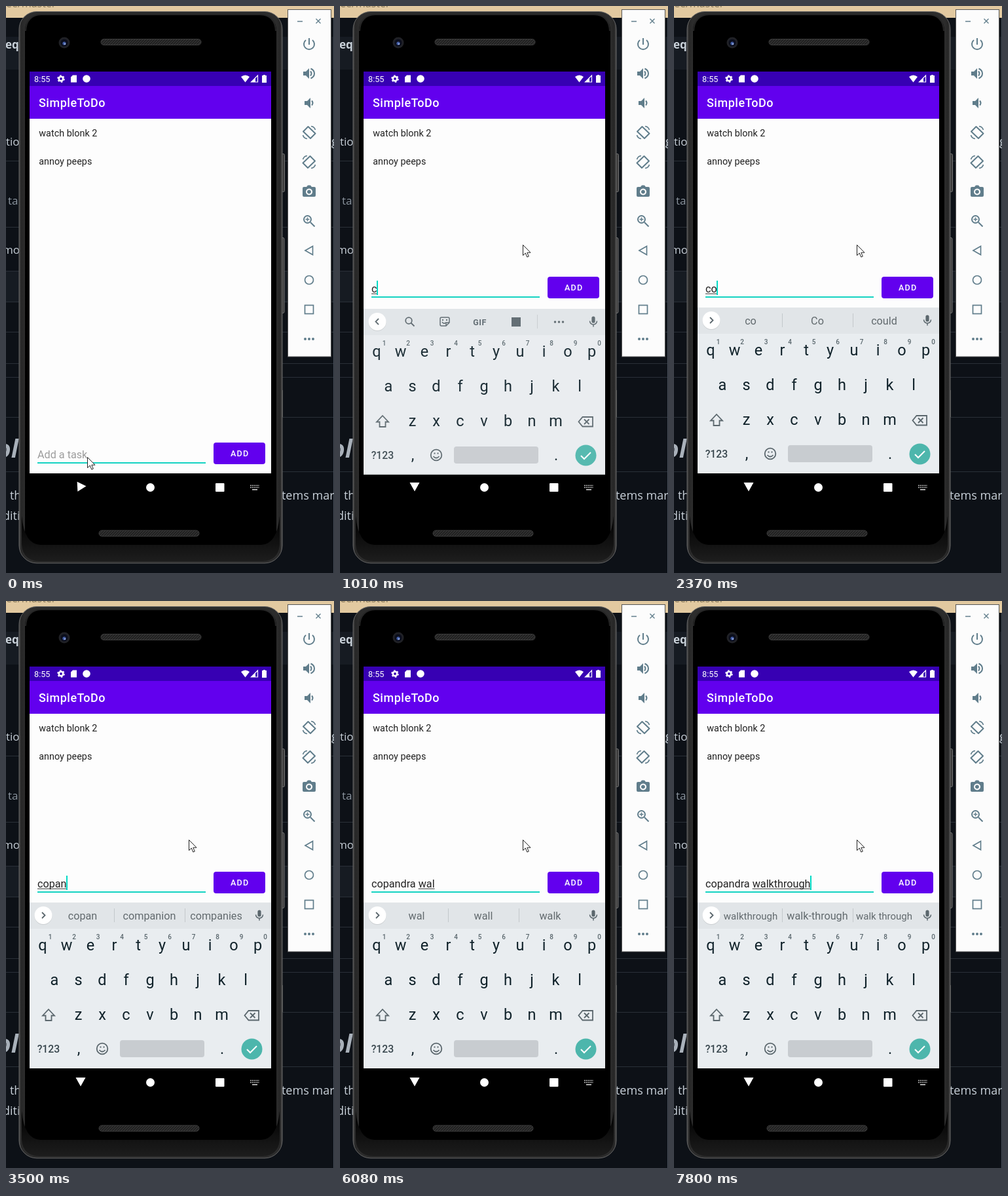
Animation, 501 px wide and 865 px high, one loop 8000 ms. Source, as an HTML page:

```html
<!DOCTYPE html>
<html lang="en">
<head>
<meta charset="utf-8">
<title>To-do app demo</title>
<style>
  html, body { margin: 0; width: 100%; height: 100%; overflow: hidden; background: #0d1117; }
  svg { display: block; width: 501px; height: 865px; font-family: Roboto, sans-serif; }
  text { white-space: pre; }
  .page { font: 18px "Open Sans", sans-serif; fill: #c9d1d9; }
  .mid { text-anchor: middle; }
  .line { fill: none; stroke-width: 2; }
  .tools { fill: #607d8b; stroke: #607d8b; }
  .tools g { stroke-width: 0; }
  .tools .line { stroke-width: 2; fill: none; }
  .tools .thin { stroke-width: 1.7; }
  .keys { font-size: 23.5px; fill: #10222a; }
  .digits { font-size: 10px; fill: #59666c; }
  .words { font-size: 16.2px; fill: #626a6e; }
  .grey { fill: #5b676d; stroke: none; }
  .greyLine { fill: none; stroke: #5b676d; stroke-width: 1.8; }
</style>
</head>
<body>
<svg viewBox="0 0 501 865">
  <defs>
    <linearGradient id="frame">
      <stop offset="0" stop-color="#4a4a4a"/><stop offset=".008" stop-color="#262626"/>
      <stop offset=".02" stop-color="#2c2c2c"/><stop offset=".98" stop-color="#2c2c2c"/>
      <stop offset=".992" stop-color="#262626"/><stop offset="1" stop-color="#4a4a4a"/>
    </linearGradient>
    <linearGradient id="chin" x2="0" y2="1">
      <stop offset="0" stop-color="#000"/><stop offset="1" stop-color="#1d1d1d"/>
    </linearGradient>
    <pattern id="mesh" width="4" height="4" patternUnits="userSpaceOnUse">
      <rect width="4" height="4" fill="#222"/><path d="M0 4L4 0" stroke="#3c3c3c"/>
    </pattern>
    <clipPath id="screen"><rect x="36" y="100" width="369" height="615"/></clipPath>
  </defs>

  <!-- web page behind the emulator -->
  <rect width="501" height="865" fill="#0d1117"/>
  <path fill="#161b22" d="M0 47h501v50H0zM0 404h501v47H0z"/>
  <rect width="501" height="18" fill="#e2c9a0"/>
  <path stroke="#2a3038" d="M0 236.5h501M0 337.5h501M0 404.5h501M0 451.5h501M0 497.5h501M0 545.5h501M0 566.5h501M0 627.5h501M0 710.5h501"/>
  <path stroke="#444c56" d="M500.5 18v847"/>
  <g class="page">
    <text x="0" y="2" font-size="16" style="fill:#857658">ee/master</text>
    <text x="-1" y="65" font-size="17" font-weight="700">eq</text>
    <text x="0" y="213" font-size="17">tio</text>
    <text x="3" y="303" font-size="17" style="fill:#8b949e">ta</text>
    <text x="-5" y="378" font-size="17">mo</text>
    <text x="-14" y="689" font-size="37" font-weight="700" font-style="italic" style="fill:#a9b1ba">ol</text>
    <text x="6" y="753">th</text>
    <text x="-5" y="784">diti</text>
    <text x="421" y="753">tems mar</text>
    <text x="497" y="213">g</text>
  </g>

  <!-- phone body -->
  <g fill="#3b3b3b" stroke="#747474">
    <rect x="418" y="225.5" width="7.5" height="58" rx="2"/>
    <rect x="418" y="353.5" width="7" height="115" rx="2"/>
    <path d="M422.5 586v41" stroke="#555"/>
  </g>
  <rect x="20" y="8.5" width="402" height="841.5" rx="27" fill="url(#frame)" stroke="#666"/>
  <rect x="29" y="13" width="384" height="832" rx="24" fill="#000"/>
  <path d="M24 778V822Q26 846 50 847H392Q416 846 418 822V778Q414 821 390 822H52Q28 821 24 778Z" fill="url(#chin)"/>
  <path d="M30 38Q31 14 54 13H388Q411 14 412 38" fill="none" stroke="#262626" stroke-width="2"/>
  <g fill="url(#mesh)" stroke="#3d3d3d">
    <rect x="145" y="50.5" width="153" height="9" rx="4.5"/>
    <rect x="142" y="800" width="153" height="9" rx="4.5"/>
  </g>
  <circle cx="89" cy="56" r="8.5" fill="#202126"/>
  <circle cx="89" cy="56" r="5.5" fill="#0b0e1c"/>
  <circle cx="89" cy="57" r="2.6" fill="#4560a8"/>
  <circle cx="90" cy="58" r="1" fill="#c2d0f4"/>

  <!-- app -->
  <rect x="36" y="172" width="369" height="541" fill="#fdfdfd"/>
  <rect x="36" y="100" width="369" height="22" fill="#3700b3"/>
  <rect x="36" y="122" width="369" height="50" fill="#6200ee"/>
  <g fill="#fff">
    <text x="43" y="116" font-size="12.7">8:55</text>
    <circle cx="84" cy="111" r="3.2" fill="none" stroke="#fff" stroke-width="2.6"/>
    <circle cx="84" cy="111" r="5" fill="none" stroke="#fff" stroke-width="1.6" stroke-dasharray="2.6 2.636"/>
    <path d="M102 105.5h6v11h-9v-8zM359 108q6.500-5 13 0l-6.500 8.500zM391 106h2v-1h3v1h2v11h-7z"/>
    <circle cx="123" cy="111" r="5.8"/>
    <path d="M384.5 106v10h-10z" fill="none" stroke="#fff" stroke-width="1.2"/>
    <path d="M381 110v6h-6z"/>
    <text x="50" y="154" font-size="18" font-weight="500" letter-spacing=".5">SimpleToDo</text>
  </g>
  <g font-size="14.4" fill="#212121">
    <text x="50.3" y="199">watch blonk 2</text>
    <text x="50.3" y="242">annoy peeps</text>
  </g>

  <g id="bar">
    <rect x="48" y="443" width="257" height="2" fill="#14d3c2"/>
    <text id="hint" x="48" y="437" font-size="16.2" fill="#9d9d9d">Add a task</text>
    <text id="entry" x="48" y="437" font-size="16.2" fill="#212121"></text>
    <rect id="under" y="438.5" height="1" fill="#333"/>
    <rect id="caret" y="419" width="2" height="22" fill="#03dac5"/>
    <rect x="317" y="413" width="79" height="33" rx="4" fill="#6200ee"/>
    <text class="mid" x="357.2" y="434" font-size="12.6" font-weight="500" letter-spacing="1.12" fill="#fff">ADD</text>
  </g>

  <!-- navigation bar -->
  <g fill="#fff">
    <path id="back" d="M-7.500-6H7.500L0 7.500Z"/>
    <circle cx="220.5" cy="734.5" r="6.5"/>
    <rect x="320" y="728" width="13.5" height="13" rx="1"/>
    <path stroke="#ddd" stroke-width="1.5" stroke-dasharray="1.5 1.2" d="M373 731.5h14M373 734.5h14"/>
    <path stroke="#ddd" stroke-width="1.5" d="M376 737.8h8"/>
  </g>

  <!-- on-screen keyboard -->
  <g clip-path="url(#screen)"><g id="keyboard">
    <rect x="36" y="460" width="369" height="253" fill="#e9edf0"/>
    <rect x="36" y="460" width="369" height="40" fill="#e1e5e8"/>
    <circle cx="57" cy="480.5" r="13.5" fill="#000" opacity=".1"/>
    <circle cx="57" cy="479.5" r="13.5" fill="#fff"/>
    <path id="chevron" class="greyLine" d="M-2-4.500L2.500 0L-2 4.500"/>
    <g class="grey" transform="translate(387 479.5)">
      <rect x="-2.6" y="-8" width="5.2" height="10" rx="2.6"/>
      <path class="greyLine" style="stroke-width:1.5" d="M-5.500-1A5.500 5.500 0 0 0 5.500-1M0 4.500V8"/>
    </g>
    <g id="shortcuts">
      <circle class="greyLine" cx="105" cy="478" r="4.8"/>
      <path class="greyLine" d="M108.5 481.5l5 5"/>
      <path class="greyLine" style="stroke-width:1.5" d="M155 473h10q2 0 2 2v6l-5 5h-7q-2 0-2-2v-9q0-2 2-2zM167 481h-5v5M156 480q3 4 5 1"/>
      <path class="grey" d="M156 476h2v2h-2zM162 476h2v2h-2z"/>
      <text class="mid grey" x="213.5" y="484.5" font-size="12.5" font-weight="700" letter-spacing=".5">GIF</text>
      <rect class="grey" x="262" y="473" width="14" height="14"/>
      <path stroke="#c7cccf" d="M301.5 469v21"/>
      <path class="greyLine" stroke-linecap="round" style="stroke-width:3.5" d="M328.5 480h0M334.5 480h0M340.5 480h0"/>
    </g>
    <g id="strip" class="words mid">
      <path stroke="#c3c8cb" d="M165.5 469v21M273.5 469v21"/>
      <text x="117" y="486"></text><text x="219" y="486"></text><text x="321" y="486"></text>
    </g>
    <g id="keys" class="keys mid"></g>
    <g id="digits" class="digits mid" font-weight="500"></g>
    <path class="greyLine" d="M65 623l9 9.500h-4.500v7.500h-9v-7.500h-4.500z"/>
    <path class="greyLine" d="M370.5 625h15.500v14.500h-15.500l-6-7.250zM373 628.5l7.500 7.500M380.5 628.5l-7.500 7.500"/>
    <text class="mid" x="65" y="689" font-size="15.8" font-weight="500" fill="#3a484f">?123</text>
    <g class="keys mid"><text x="111" y="691">,</text><text x="330" y="691">.</text></g>
    <circle class="greyLine" cx="147" cy="683" r="8.3"/>
    <path class="greyLine" d="M142.5 685q4.500 5 9 0M143.5 680.5h2M148.5 680.5h2"/>
    <rect x="174" y="670" width="129" height="26" rx="4" fill="#c8ccd0"/>
    <circle cx="375.5" cy="683.5" r="16" fill="#4db6ac"/>
    <path class="line" stroke="#fff" d="M368 684l5 5l10-10"/>
  </g></g>

  <!-- emulator controls -->
  <rect x="430.5" y="5.5" width="66" height="529.5" fill="#fcfcfc" stroke="#555"/>
  <g class="tools" transform="translate(463 0)">
    <path d="M-18 23.5h8M10.5 19.5l7 7M17.5 19.5l-7 7" stroke-width="1.4"/>
    <path class="line" d="M-5 52A8 8 0 1 0 5 52M0 49v10"/>
    <g transform="translate(0 103)">
      <path d="M-9-3h4l5-5V8l-5-5h-4z"/>
      <path class="line" d="M2-3.500Q5 0 2 3.500M2.500-7.500Q8-5 8 0T2.500 7.500"/>
    </g>
    <g transform="translate(0 148)">
      <path d="M-7-3h4l5-5V8l-5-5h-4z"/>
      <path class="line" d="M4-3.500Q7 0 4 3.500"/>
    </g>
    <g id="turn" transform="translate(0 193)">
      <path class="line" stroke-linejoin="round" d="M-1.500-9L9.500 1.500L2 9L-9-1.500Z"/>
      <path class="line thin" d="M-9.500 4Q-8 9-3 9.500M3-9.500Q8-9 9.500-4"/>
    </g>
    <use href="#turn" transform="matrix(-1 0 0 1 0 45)"/>
    <path stroke="none" fill-rule="evenodd" d="M-8-7h4l2-2.500h4l2 2.500h4q2 0 2 2v11q0 2-2 2h-16q-2 0-2-2v-11q0-2 2-2zM0-4.500a5 5 0 1 0 .1 0zM0-2.500a3 3 0 1 1-.1 0z" transform="translate(0 283)"/>
    <circle class="line" cx="-2.5" cy="325.5" r="5.5"/>
    <path class="line" d="M2 330l6.500 6.500"/>
    <path d="M-5.500 325.5h6M-2.500 322.5v6" stroke-width="1.4"/>
    <path class="line thin" d="M5.500 366.5v13L-6 373z"/>
    <circle class="line thin" cy="418" r="6.5"/>
    <rect class="line thin" x="-6.5" y="456.5" width="13" height="13"/>
    <path class="line" stroke-linecap="round" style="stroke-width:4" d="M-6 508h0M0 508h0M6 508h0"/>
  </g>

  <path id="mouse" d="M.5.5V16.500L4.300 13L6.800 19L9.300 18L6.800 12.200H12Z" fill="#fff" stroke="#222"/>
</svg>

<script>
const LOOP = 8000;
const $ = id => document.getElementById(id);

// time, finished text, word being typed, caret shown, suggestions
const NAME = 'copandra ';
const steps = [
  [0, '', '', 0],
  [120, '', '', 1],
  [760, '', '', 0],
  [1010, '', 'c', 1],
  [1130, '', 'co', 1, 'co,Co,could'],
  [1370, '', 'cos', 1, 'cos,cost,Cos'],
  [1870, '', 'cos', 0, 'cos,cost,Cos'],
  [2370, '', 'co', 1, 'co,Co,could'],
  [2490, '', 'copa', 1, 'copa,Copa,copay'],
  [3000, '', 'copa', 0, 'copa,Copa,copay'],
  [3500, '', 'copan', 1, 'copan,companion,companies'],
  [3640, '', 'copand', 1, 'copand,expand,expanding'],
  [3900, '', 'copandr', 1, 'copandr,copand,expanders'],
  [4040, '', 'copandra', 1, 'copandra,Copandra,expand'],
  [4160, NAME, '', 1, 'is,and,I'],
  [4700, NAME, '', 0, 'is,and,I'],
  [5200, NAME, 'w', 1, 'w,W,we'],
  [5460, NAME, 'wa', 1, 'wa,was,way'],
  [5580, NAME, 'wal', 1, 'wal,wall,walk'],
  [6080, NAME, 'wal', 0, 'wal,wall,walk'],
  [6640, NAME, 'walk', 1, 'walk,walking,walked'],
  [6920, NAME, 'walkt', 1, 'walkt,walk,walked'],
  [7040, NAME, 'walkth', 1, 'walkth,walk the,walk through'],
  [7160, NAME, 'walkthr', 1, 'walkthr,walkthrough,walk through'],
  [7280, NAME, 'walkthro', 1, 'walkthro,walkthrough,walk through'],
  [7530, NAME, 'walkthrou', 1, 'walkthrou,walkthrough,walk through'],
  [7680, NAME, 'walkthroug', 1, 'walkthroug,walkthrough,walk through'],
  [7800, NAME, 'walkthrough', 1, 'walkthrough,walk-through,walk through']
];

function label(parent, char, x, y) {
  const node = document.createElementNS('http://www.w3.org/2000/svg', 'text');
  node.setAttribute('x', x);
  node.setAttribute('y', y);
  node.textContent = char;
  parent.append(node);
}

[['qwertyuiop', 56], ['asdfghjkl', 74], ['zxcvbnm', 110.5]].forEach(([row, left], r) =>
  [...row].forEach((char, i) => label($('keys'), char, left + i * 36.5, 533 + r * 53)));
[...'1234567890'].forEach((char, i) => label($('digits'), char, 67.5 + i * 36.5, 516));

const place = (id, transform) => $(id).setAttribute('transform', transform);
const show = (id, visible) => $(id).style.display = visible ? '' : 'none';

function typedWidth(text) {
  $('entry').textContent = text;
  return text ? $('entry').getComputedTextLength() : 0;
}

function drawEntry([, done, word, caret, words]) {
  const start = 48 + typedWidth(done);
  const end = 48 + typedWidth(done + word);
  $('under').setAttribute('x', start);
  $('under').setAttribute('width', end - start);
  $('caret').setAttribute('x', Math.floor(end));
  show('caret', caret);
  show('hint', !(done + word));
  show('strip', words);
  show('shortcuts', !words);
  place('chevron', `translate(57 479.5) scale(${words ? 1 : -1} 1)`);
  if (!words) return;
  const slots = $('strip').querySelectorAll('text');
  words.split(',').forEach((item, i) => {
    slots[i].textContent = item;
    slots[i].style.fontSize = item.length > 10 && i !== 1 ? '15px' : '';
  });
}

let current;
function frame() {
  const t = performance.now() % LOOP;
  const step = steps.findLast(([time]) => time <= t);
  if (step !== current) drawEntry(current = step);

  place('bar', `translate(0 ${t < 510 ? 253 : 0})`);
  place('back', `translate(${t < 120 ? 115 : 114} 733) rotate(${t < 120 ? -93 : t < 240 ? -40 : 0})`);
  place('mouse', `translate(${t < 120 ? '124 688' : t < 240 ? '210 510' : '279 364'})`);
  show('keyboard', t >= 1010);
  place('keyboard', `translate(0 ${t < 1130 ? 2 : 0})`);
  $('keyboard').style.opacity = t < 1130 ? .94 : 1;
  requestAnimationFrame(frame);
}
frame();
</script>
</body>
</html>
```
